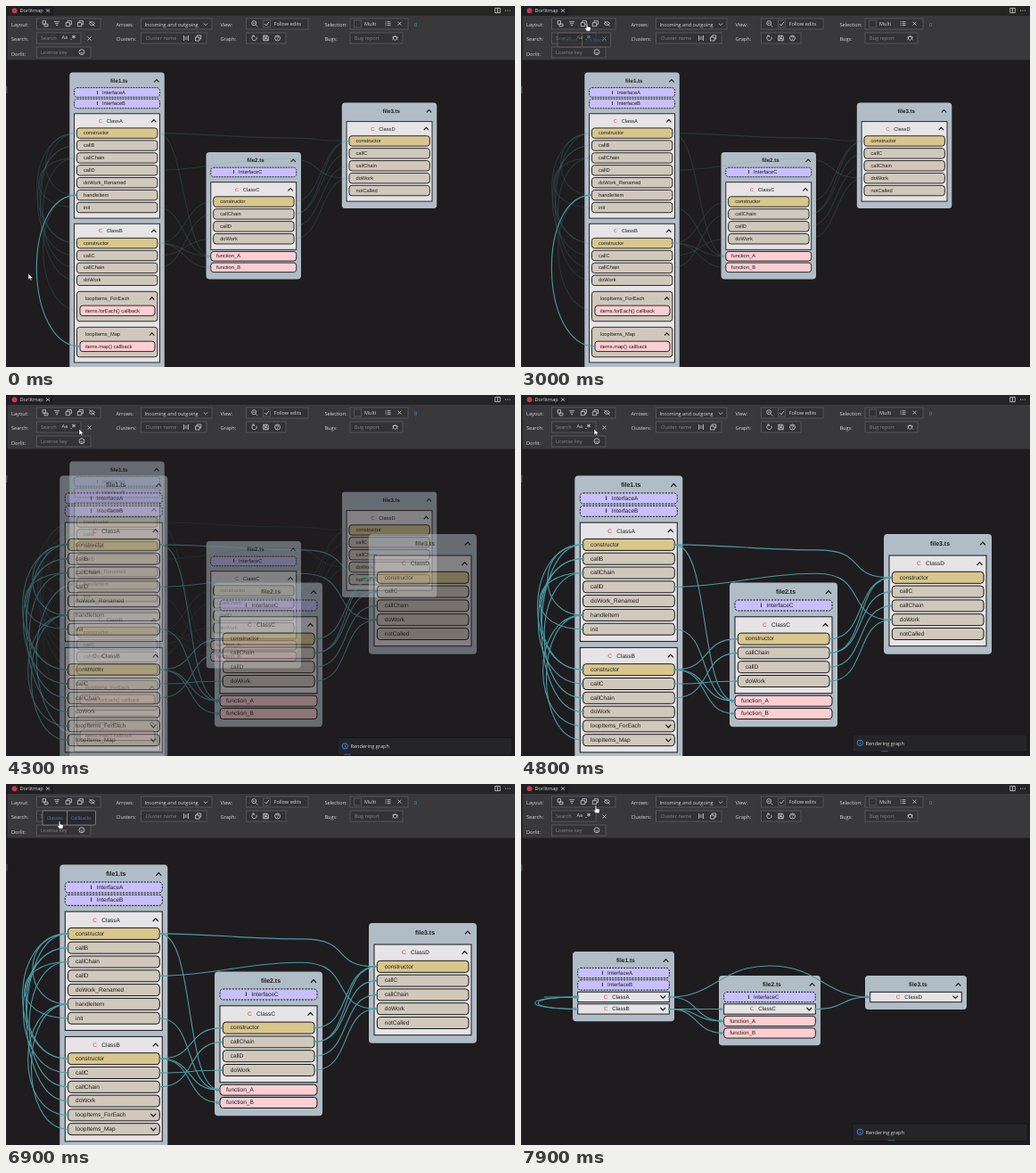
An HTML page for the animation above (8 s loop, 571 by 405 pixels).

```html
<!DOCTYPE html>
<html lang="en">
<head>
<meta charset="utf-8">
<title>Graph layout</title>
<style>
html, body { margin: 0; width: 100%; height: 100%; overflow: hidden; background: #1e1c1e; }
svg { display: block; width: 571px; height: 405px; text-rendering: geometricPrecision; }
text { white-space: pre; }
.ui text { font: 5.6px "Open Sans", "Noto Sans", sans-serif; fill: #d8d8d8; }
.ui text.hint { fill: #858585; }
.graph text { font: 6.5px "Liberation Sans", Arial, sans-serif; fill: #1c1c1c; }
.graph text.title { font-size: 7px; font-weight: bold; text-anchor: middle; }
.graph text.sign { font-weight: bold; }
.graph text.mark { fill: #d0463e; }
.icon { fill: none; stroke: #d0d0d0; stroke-width: .8; }
.field { fill: #333234; stroke: #5c5c5e; stroke-width: .8; }
</style>
</head>
<body>
<svg id="stage" viewBox="0 0 571 405"></svg>
<script>
const NS = 'http://www.w3.org/2000/svg';
const stage = document.getElementById('stage');

function add(parent, tag, attrs = {}, content) {
  const el = document.createElementNS(NS, tag);
  for (const k in attrs) el.setAttribute(k, attrs[k]);
  if (content) el.textContent = content;
  parent.appendChild(el);
  return el;
}
const rect = (p, x, y, width, height, attrs) => add(p, 'rect', { x, y, width, height, ...attrs });
const path = (p, d, attrs) => add(p, 'path', { d, ...attrs });
// y is the vertical middle of the line
const label = (p, x, y, str, cls = '') => add(p, 'text', { x, y: y + 2.1, class: cls }, str);

// ---------- graph ----------
const FILL = { file: '#b1bdc6', cls: '#e6e4e7', ctor: '#d8c68d', method: '#d1c8bc', fn: '#ffced3', iface: '#c7c0fd' };
const TEAL = '#4b9ba3';
const INK = { stroke: '#141414', 'stroke-width': 1 };

const FILES = [
  { name: 'file1.ts', ifaces: ['A', 'B'], fns: [], classes: {
    A: ['constructor', 'callB', 'callChain', 'callD', 'doWork_Renamed', 'handleItem', 'init'],
    B: ['constructor', 'callC', 'callChain', 'doWork', 'loopItems_ForEach', 'loopItems_Map'] } },
  { name: 'file2.ts', ifaces: ['C'], fns: ['function_A', 'function_B'], classes: {
    C: ['constructor', 'callChain', 'callD', 'doWork'] } },
  { name: 'file3.ts', ifaces: [], fns: [], classes: {
    D: ['constructor', 'callC', 'callChain', 'doWork', 'notCalled'] } }
];
const RIGHT = ['A0>D0', 'A3>D3', 'A0>f0', 'A6>f0', 'B0>C0', 'B0>f0', 'B0>f1', 'B1>C3', 'B2>C1',
  'C0>D0', 'C1>D0', 'C1>D1', 'C2>D2', 'C3>D3'];
const LEFT = ['A0>B0', 'B0>A1', 'A2>B2', 'A0>A5', 'A2>A6', 'B4>A5', 'B5>A5', 'A1>B1', 'B3>A0'];
const VIA = { 'A0>D0': 6, 'A3>D3': -15 };

const LAYOUTS = [
  { s: .88, at: [[71.3, 74.5], [224.5, 164], [376.8, 108.5]], callbacks: true, focus: 'B5>A5' },
  { s: 1, at: [[60.3, 90.5], [234, 210.5], [407, 156]] },
  { s: .942, at: [[58, 188], [222, 215], [386, 215]], closed: true }
];

const chevron = (p, x, y, up) =>
  path(p, up ? `M${x - 3} ${y + 1.6}l3-3.2 3 3.2` : `M${x - 3} ${y - 1.6}l3 3.2 3-3.2`,
    { fill: 'none', stroke: '#111', 'stroke-width': 1.2 });

function pill(p, x, cy, w, h, fill, extra) {
  return rect(p, x, cy - h / 2, w, h, { rx: 3.5, fill, ...INK, ...extra });
}

function drawFile(root, file, [x, y], L, ports) {
  const g = add(root, 'g', { transform: `translate(${x} ${y}) scale(${L.s})` });
  const back = rect(g, 0, 0, 121, 10, { rx: 4, fill: FILL.file });
  const port = (key, l, r, cy) => ports[key] = { l: x + l * L.s, r: x + r * L.s, y: y + cy * L.s };
  let cy = 19;
  label(g, 63, 10.7, file.name, 'title');
  chevron(g, 111, 10.7, true);

  for (const n of file.ifaces) {
    const c = cy + 6.5;
    pill(g, 6, c, 109, 12, FILL.iface, { 'stroke-dasharray': '2.2 1.2' });
    label(g, 34.5, c - .3, 'I', 'sign');
    label(g, 41.5, c - .3, 'Interface' + n);
    cy += 14.3;
  }
  for (const [n, members] of Object.entries(file.classes)) {
    const top = L.closed ? cy + .5 : cy + 5;
    const box = rect(g, 6, top, 109, 12, { fill: FILL.cls, ...INK });
    const mid = L.closed ? top + 6 : top + 9.3;
    label(g, 37, mid, 'C', 'mark');
    label(g, 47, mid, 'Class' + n);
    chevron(g, 107.5, mid, !L.closed);
    if (L.closed) {
      port(n, 6, 115, mid);
      cy += 14.3;
      continue;
    }
    let c = top + 24.8;
    members.forEach((m, i) => {
      const loop = m.startsWith('loop');
      if (loop && L.callbacks) {
        const t = c - 1.6;
        rect(g, 9.3, t, 102.7, 38, { rx: 3.5, fill: FILL.method, ...INK });
        label(g, 20, t + 8.7, m);
        chevron(g, 105, t + 9, true);
        pill(g, 13.3, t + 24.5, 95.4, 13, FILL.fn);
        label(g, 20, t + 24.3, `items.${i === 4 ? 'forEach' : 'map'}() callback`);
        port(n + i, 13.3, 108.7, t + 24.5);
        c = t + 47.1;
      } else {
        pill(g, 9.3, c, 102.7, 13, i ? FILL.method : FILL.ctor);
        label(g, 17.8, c - .3, m);
        if (loop) chevron(g, 105, c, false);
        port(n + i, 9.3, 112, c);
        c += 15.8;
      }
    });
    const bottom = c - 2.1;
    box.setAttribute('height', bottom - top);
    cy = bottom + 2;
  }
  file.fns.forEach((n, i) => {
    const c = cy + 6.5;
    pill(g, 6, c, 109, 12, FILL.fn);
    label(g, 13, c - .3, n);
    port('f' + i, 6, 115, c);
    cy += 14.3;
  });
  back.setAttribute('height', cy + 7);
}

function drawEdges(root, L, ports) {
  const seen = new Set();
  const find = key => ports[key] ? key : key[0];
  const line = (edge, d, a, ax, b) => {
    const g = add(root, 'g', { opacity: !L.focus || edge === L.focus ? 1 : .2 });
    path(g, d, { fill: 'none', stroke: TEAL, 'stroke-width': 1.1 });
    add(g, 'circle', { cx: ax, cy: a.y, r: 1.3, fill: TEAL });
    path(g, `M${b.l} ${b.y}l-4-2v4z`, { fill: TEAL });
  };
  const each = (list, draw) => list.forEach((edge, i) => {
    const [from, to] = edge.split('>').map(find);
    const id = from + '>' + to;
    if (seen.has(id)) return;
    seen.add(id);
    draw(edge, ports[from], ports[to], i);
  });

  each(RIGHT, (edge, a, b) => {
    const k = Math.min(55, (b.l - a.r) * .6) * L.s;
    let d = `M${a.r} ${a.y}C${a.r + k} ${a.y} `;
    if (edge in VIA) {
      const mx = L.closed ? (a.r + b.l) / 2 : b.l - 85 * L.s;
      const my = a.y + (L.closed ? -35 : VIA[edge] * L.s);
      d += `${mx - 60 * L.s} ${my} ${mx} ${my}S`;
    }
    line(edge, d + `${b.l - k} ${b.y} ${b.l} ${b.y}`, a, a.r, b);
  });
  each(LEFT, (edge, a, b, i) => {
    const k = (edge === L.focus ? 71 : 68 - (i * 5) % 17) * L.s;
    line(edge, `M${a.l} ${a.y}C${a.l - k} ${a.y} ${b.l - k} ${b.y} ${b.l} ${b.y}`, a, a.l, b);
  });
}

const graphs = LAYOUTS.map(L => {
  const g = add(stage, 'g', { class: 'graph' });
  const ports = {};
  FILES.forEach((f, i) => drawFile(g, f, L.at[i], L, ports));
  drawEdges(g, L, ports);
  return g;
});

// ---------- toolbar ----------
const ui = add(stage, 'g', { class: 'ui' });
const ICON = {
  copy: 'M-3-1h4.500v4h-4.500zM-1.300-1v-2h4.500v4h-1.700',
  filter: 'M-3-2h6M-2 0h4M-1 2h2',
  eye: 'M-3.200 0q3.200-4 6.400 0q-3.200 4-6.400 0M-3-3l6 6',
  close: 'M-2-2l4 4M2-2l-4 4',
  zoom: 'M1.600 1.600l2 2M2-.600a2.500 2.500 0 1 1-5 0a2.500 2.500 0 1 1 5 0M-1.800-.600h2.600',
  redo: 'M2.300-1.300a2.700 2.700 0 1 1-2.800-1.300M-2.200-3h2v2',
  save: 'M-2.800-2.800h4.600l1 1v4.600h-5.600zM-1.500-2.800v2h2.500v-2M-1.500 2.800v-2.300h3v2.300',
  help: 'M3 0a3 3 0 1 1-6 0a3 3 0 1 1 6 0M-1-.700q0-1.200 1-1.200t1 1q0 .700-1 1.200M0 1.200v.800',
  smile: 'M3 0a3 3 0 1 1-6 0a3 3 0 1 1 6 0M-1.500.700q1.500 1.600 3 0M-1.100-1v.500M1.100-1v.500',
  list: 'M-3-2h1M-1-2h4M-3 0h1M-1 0h4M-3 2h1M-1 2h4',
  bars: 'M-2.500-3v6M2.500-3v6M-1.500-1h3M-1.500 1h3',
  bug: 'M-2-1.500h4v2.500q-2 2.800-4 0zM-1.300-1.500q1.300-2.400 2.600 0M-3.200-1l1.200.6M3.200-1l-1.200.6M-3.200 2l1.200-1M3.200 2l-1.200-1',
  down: 'M-2.200-1l2.200 2.200 2.200-2.200',
  check: 'M-2.300 0l1.700 2 3-4',
  split: 'M-2.800-2.600h5.600v5.200h-5.600zM0-2.600v5.200',
  lock: 'M-3-3h3.500v3.500h-3.500zM-1 .500h4v2.600h-4z'
};
const icon = (name, x, y) => path(ui, ICON[name], { class: 'icon', transform: `translate(${x} ${y})` });
const field = (x1, x2, row) => rect(ui, x1, [14, 30, 46][row], x2 - x1, 12, { class: 'field' });

rect(ui, 0, 0, 571, 11, { fill: '#252526' });
rect(ui, 0, 0, 53, 11, { fill: '#1f1e20' });
rect(ui, 1.5, 11, 570, 49.5, { fill: '#39383a' });
rect(ui, 0, 11, 1.5, 394, { fill: '#242325' });
rect(ui, 0, 90, 1.5, 8, { fill: '#4a4a4c' });
add(ui, 'circle', { cx: 9.5, cy: 5.3, r: 3, fill: '#c23a50' });
label(ui, 15.5, 5.2, 'Dorlitmap');
icon('close', 47, 5.2);
icon('split', 551.5, 5);
[560.5, 563, 565.5].forEach(cx => add(ui, 'circle', { cx, cy: 5, r: .6, fill: '#d0d0d0' }));

[[6, 'Layout:', 'Search:', 'Dorlit:'], [123.500, 'Arrows:', 'Clusters:'],
 [240.500, 'View:', 'Graph:'], [357.500, 'Selection:', 'Bugs:']].forEach(([x, ...rows]) =>
  rows.forEach((str, i) => label(ui, x, [21, 37, 53.5][i], str)));

field(34.5, 106, 0);
['lock', 'filter', 'copy', 'copy', 'eye'].forEach((n, i) => icon(n, 44 + i * 13.1, 19.7));
field(34.5, 84, 1);
label(ui, 39, 36, 'Search', 'hint');
label(ui, 62.5, 35, 'Aa');
path(ui, 'M76-2v4M74-1l4 2M78-1l-4 2M72.500 3h1.200', { class: 'icon', transform: 'translate(0 34.5)' });
icon('close', 93.5, 36.5);
field(34.5, 95, 2);
label(ui, 39, 52, 'License key', 'hint');
icon('smile', 85, 51.7);

field(151.5, 231, 0);
label(ui, 155.5, 20.8, 'Incoming and outgoing');
icon('down', 224, 20.5);
field(151.5, 225, 1);
label(ui, 156.5, 36, 'Cluster name', 'hint');
icon('bars', 202, 36);
icon('copy', 215.5, 36);

field(269.5, 339, 0);
icon('zoom', 278.7, 19.8);
rect(ui, 288.5, 16, 8, 8, { class: 'field' });
icon('check', 292.5, 20);
label(ui, 300.5, 20, 'Follow edits');
field(269.5, 314, 1);
['redo', 'save', 'help'].forEach((n, i) => icon(n, 278.5 + i * 13, 36));

field(386, 451, 0);
rect(ui, 390.5, 16, 8, 8, { class: 'field' });
label(ui, 402, 20, 'Multi');
icon('list', 428.5, 19.7);
icon('close', 441.5, 19.7);
label(ui, 458, 20.8, '0').style.fill = '#3fa3b5';
field(386, 445, 1);
label(ui, 391, 36, 'Bug report', 'hint');
icon('bug', 436.5, 36);

const popup = add(ui, 'g');
[[41, 27.5, 'Classes'], [68.5, 32, 'Callbacks']].forEach(([x, w, str]) => {
  rect(popup, x, 30, w, 16, { rx: 1, fill: '#29282b', stroke: '#8a8a8c', 'stroke-width': .8 });
  label(popup, x + w / 2, 38, str).style.cssText = 'fill:#3d86d8;text-anchor:middle;font-size:5.3px';
});

const toast = add(ui, 'g');
rect(toast, 372, 381, 196, 19.5, { rx: 1.5, fill: '#252527', stroke: '#171618', 'stroke-width': 1 });
add(toast, 'circle', { cx: 380.3, cy: 390.3, r: 3.2, fill: 'none', stroke: '#3794ff', 'stroke-width': .9 });
path(toast, 'M380.300 389.800v2.300M380.300 388.200v.8', { stroke: '#3794ff', 'stroke-width': .9 });
label(toast, 386.5, 390.7, 'Rendering graph');
const bit = rect(toast, 0, 399.3, 8, 1, { fill: '#4d6378' });

// ---------- pointer ----------
const pointer = add(stage, 'g');
const shapes = {
  arrow: path(pointer, 'M0 0v7l1.700-1.400 1.200 2.500 1.100-.500-1.100-2.400h2.200z',
    { fill: '#fff', stroke: '#111', 'stroke-width': .5 }),
  hand: path(pointer, 'M-.800 0q.800-.900 1.600 0v3l3 .700q.700.300.500 1.300l-.600 3.200h-4l-2.400-3.300q.300-1 1.900.100z',
    { fill: '#fff', stroke: '#111', 'stroke-width': .5 }),
  beam: path(pointer, 'M-1.300-3.500h2.600M0-3.500v7M-1.300 3.500h2.600',
    { fill: 'none', stroke: '#0c0c0c', 'stroke-width': .9 })
};

// ---------- timeline ----------
const LOOP = 8000, STEP = 100;
const TRACK = [[0, 25, 300], [900, 25, 300], [1600, 40, 276.500], [1900, 42, 265], [2700, 74, 20],
  [3200, 74, 20], [3600, 82, 38], [5000, 82, 38], [5500, 74, 20], [6500, 74, 20], [6850, 60, 42],
  [7400, 60, 42], [7800, 84, 24.500], [8000, 84, 24.500]];
const clamp = v => Math.max(0, Math.min(1, v));
const ramp = (t, a, b) => clamp((t - a) / (b - a));
const ease = p => p * p * (3 - 2 * p);

function pointerAt(t) {
  const i = TRACK.findIndex(k => k[0] > t);
  const [a, b] = [TRACK[i - 1], TRACK[i]];
  const p = ease(ramp(t, a[0], b[0]));
  return [a[1] + (b[1] - a[1]) * p, a[2] + (b[2] - a[2]) * p];
}
function pointerShape(t) {
  if (t >= 7000 && t < 7600) return 'beam';
  return t < 2600 || (t >= 3800 && t < 5400) ? 'arrow' : 'hand';
}
function show(el, opacity) {
  el.style.opacity = opacity;
  el.style.display = opacity > 0 ? '' : 'none';
}

function render(t) {
  const first = ramp(t, 4000, 4600), second = ramp(t, 7000, 7600);
  show(graphs[0], 1 - first);
  show(graphs[1], first * (1 - second));
  show(graphs[2], second);

  show(popup, ramp(t, 2900, 3100) - ramp(t, 3700, 3900) + ramp(t, 5500, 5700) - ramp(t, 6900, 7100));

  const since = t - (t < 6000 ? 4200 : 7150);
  show(toast, since < 0 ? 0 : t < 6000 ? 1 - ramp(t, 5000, 5200) : 1);
  toast.setAttribute('transform', `translate(0 ${8 * (1 - clamp(since / 300)) ** 2})`);
  bit.setAttribute('x', 374 + Math.max(0, since) * .05);

  pointer.setAttribute('transform', `translate(${pointerAt(t)})`);
  const kind = pointerShape(t);
  for (const k in shapes) shapes[k].style.display = k === kind ? '' : 'none';
}

function tick() {
  const t = performance.now() % LOOP;
  render(Math.floor(t / STEP) * STEP);
  requestAnimationFrame(tick);
}
tick();
</script>
</body>
</html>
```
